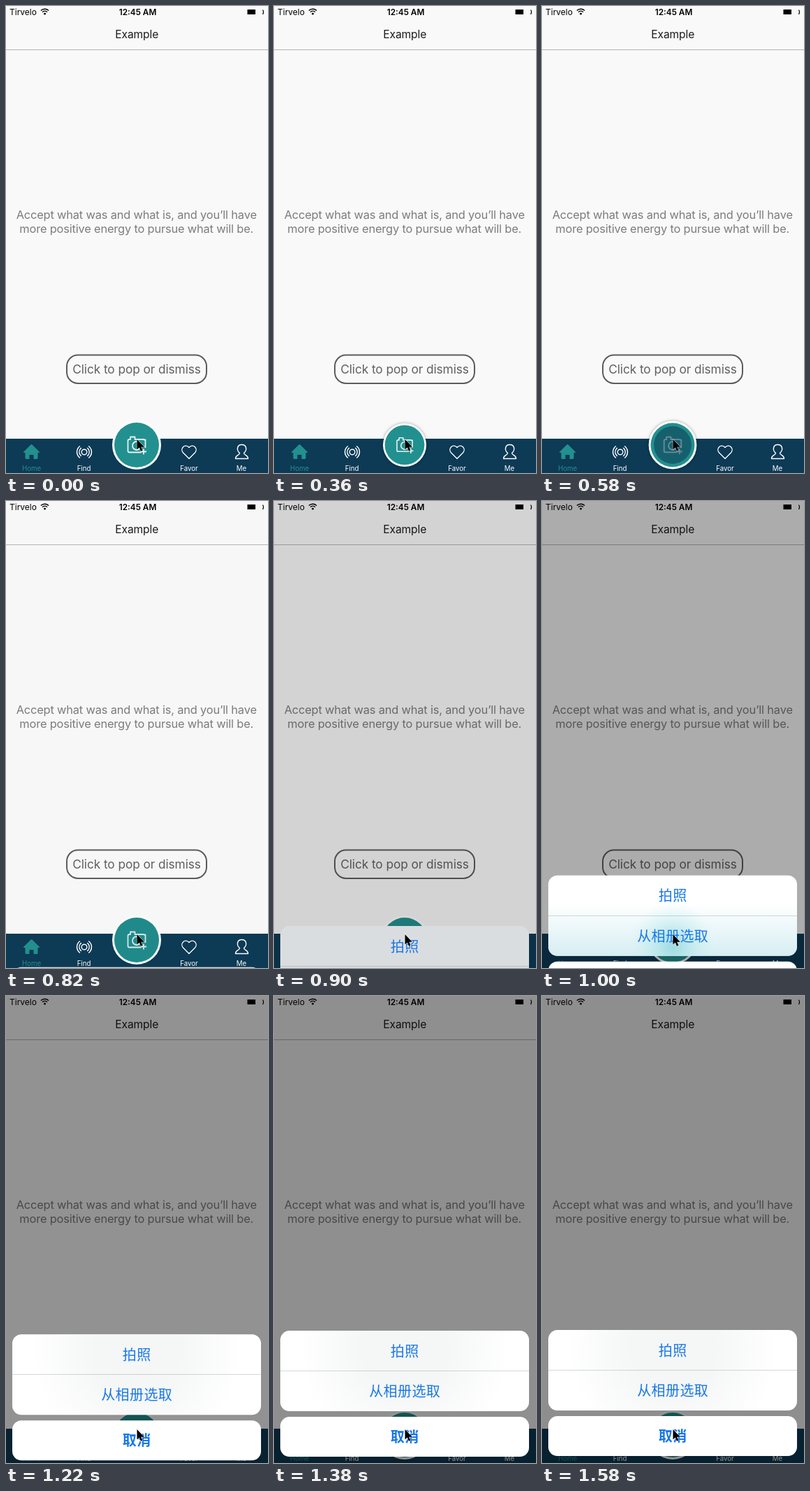
These frames come from a looping animation (375x667 px, 2.58 s). An HTML page with a canvas:

```html
<!DOCTYPE html>
<html lang="en">
<head>
<meta charset="utf-8">
<title>Action sheet</title>
<style>
  html, body { margin: 0; width: 100%; height: 100%; overflow: hidden; background: #f9f9f9; }
  canvas { display: block; width: 375px; height: 667px; }
</style>
</head>
<body>
<canvas id="stage"></canvas>
<script>
const W = 375, H = 667, LOOP = 2580;
const RISE = 812, SETTLED = 1560;
const LATIN = 'Inter, sans-serif';
const HAN = '"Noto Sans CJK SC", "Noto Sans CJK", sans-serif';
const TEAL = '#22908f', NAVY = '#0d3a55', BLUE = '#1877e8';
const HUB = { x: 187, y: 627 };

const canvas = document.getElementById('stage');
const ctx = canvas.getContext('2d');
const dpr = window.devicePixelRatio || 1;
canvas.width = W * dpr;
canvas.height = H * dpr;

const clamp = v => Math.max(0, Math.min(1, v));
const ramp = (t, a, b) => clamp((t - a) / (b - a));
const smooth = v => v * v * (3 - 2 * v);

// Share of the way still to go in a critically damped spring.
function springLeft(t) {
  const p = Math.max(0, t - RISE) * 0.0128;
  return (1 + p) * Math.exp(-p);
}

function text(str, x, y, size, color, { weight = 400, align = 'center', font = LATIN, track = 0 } = {}) {
  ctx.font = `${weight} ${size}px ${font}`;
  ctx.letterSpacing = track + 'px';
  ctx.textAlign = align;
  ctx.fillStyle = color;
  ctx.fillText(str, x, y);
}

function disc(x, y, r, color) {
  ctx.beginPath();
  ctx.arc(x, y, r, 0, Math.PI * 2);
  ctx.fillStyle = color;
  ctx.fill();
}

function box(x, y, w, h, r) {
  ctx.beginPath();
  ctx.roundRect(x, y, w, h, r);
}

function line(d, color, width) {
  ctx.strokeStyle = color;
  ctx.lineWidth = width;
  ctx.stroke(new Path2D(d));
}

function arc(x, y, r, mid, half) {
  ctx.beginPath();
  ctx.arc(x, y, r, mid - half, mid + half);
  ctx.stroke();
}

function statusBar() {
  text('Tirvelo', 5, 13, 12, '#000', { align: 'left' });
  text('12:45 AM', 188.5, 13, 11.8, '#000', { weight: 600 });
  ctx.strokeStyle = '#000';
  ctx.lineWidth = 1.4;
  arc(55.5, 12, 7.8, -Math.PI / 2, 0.8);
  arc(55.5, 12, 4.8, -Math.PI / 2, 0.8);
  disc(55.5, 11, 1.5, '#000');
  ctx.fillStyle = '#000';
  ctx.fillRect(345.5, 5, 11.5, 7);
  line('M367.5 5.5 q2 3 0 6.5', '#000', 1.2);
}

function page(t) {
  ctx.fillStyle = '#f9f9f9';
  ctx.fillRect(0, 0, W, H);
  statusBar();
  text('Example', 187.2, 46, 15.6, '#1c1c1c', { track: -0.1 });
  if (t < SETTLED) {
    ctx.fillStyle = '#b4b4b4';
    ctx.fillRect(0, 62, W, 1);
  }
  const quote = { track: -0.17 };
  text('Accept what was and what is, and you’ll have', 186.7, 304, 16.4, '#7c7c7c', quote);
  text('more positive energy to pursue what will be.', 186.7, 324, 16.4, '#7c7c7c', quote);
  box(87, 498.5, 200, 40.5, 16);
  ctx.strokeStyle = '#5c5c5c';
  ctx.lineWidth = 2;
  ctx.stroke();
  text('Click to pop or dismiss', 187, 525, 17.3, '#606060', { track: -0.08 });
}

function tabBar() {
  ctx.fillStyle = NAVY;
  ctx.fillRect(0, 618, W, 49);

  ctx.fillStyle = TEAL;
  ctx.fill(new Path2D('M25 637 L35 627 Q36.5 625.6 38 627 L48 637 Q48.6 638 47.5 638 H45.5 V645.5 Q45.5 647 44 647 H39.5 V641 H33.5 V647 H29 Q27.5 647 27.5 645.5 V638 H25.5 Q24.4 638 25 637 Z'));

  ctx.strokeStyle = '#fff';
  ctx.lineWidth = 1.4;
  arc(112, 637, 3.8, 0, Math.PI);
  for (const side of [0, Math.PI]) {
    arc(112, 637, 7.2, side, 0.95);
    arc(112, 637, 10.5, side, 0.95);
  }
  line('M262 646.5 L253.5 638 C248.5 632.5 256 624 262 630.5 C268 624 275.5 632.5 270.5 638 Z', '#fff', 1.4);
  line('M334.5 638.5 C329.5 634.5 330.5 626.5 337.5 626.5 C344.5 626.5 345.5 634.5 340.5 638.5 C340.5 642 346.5 641 346.5 646.5 H328.5 C328.5 641 334.5 642 334.5 638.5 Z', '#fff', 1.4);

  text('Home', 36.5, 663.5, 9.7, TEAL);
  text('Find', 111.5, 663.5, 9.7, '#fff');
  text('Favor', 262, 663.5, 9.7, '#fff');
  text('Me', 337, 663.5, 9.7, '#fff');
}

function camera() {
  line('M10 -7.5 H12.5 V4 M6.5 10.5 H-10.5 Q-12.5 10.5 -12.5 8.5 V-6 Q-12.5 -8 -10.5 -8 H-9 V-11.5 H-2.5 V-8 H10.5', '#e4f3f2', 1.8);
  ctx.beginPath();
  ctx.arc(0, 1, 6, 0, Math.PI * 2);
  ctx.stroke();
  line('M10 5.5 V13.5 M6 9.5 H14', '#e4f3f2', 1.8);
}

// The round button: shrinks under the press, springs back with a ripple.
function hub(t) {
  const press = smooth(ramp(t, 20, 340)) * (1 - smooth(ramp(t, 400, 640)));
  const glow = ramp(t, 100, 340) * (1 - ramp(t, 620, 820));
  const scale = 1 - 0.114 * press;
  ctx.save();
  ctx.translate(HUB.x, HUB.y);
  ctx.scale(scale, scale);
  ctx.shadowColor = `rgba(0,0,0,${0.35 * glow})`;
  ctx.shadowBlur = 4 * dpr;
  disc(0, 0, 35, '#fff');
  ctx.shadowColor = 'transparent';
  disc(0, 0, 32, TEAL);
  camera();
  const r = 32 * ramp(t, 380, 615);
  const fade = 1 - ramp(t, 650, 840);
  if (r > 0 && fade > 0) disc(0, 0, r, `rgba(13,58,85,${0.55 * fade})`);
  ctx.restore();
}

function card(y, h, left) {
  const grey = ramp(left, 0.3, 0.68);
  box(9, y, 356, h, 13);
  ctx.fillStyle = `rgb(${255 - 37 * grey},${255 - 34 * grey},${255 - 32 * grey})`;
  ctx.fill();
}

// The bar and the button shine through the frosted card while it rises.
function frost(y, h, left) {
  const tint = ramp(left, 0.04, 0.3) * (1 - ramp(left, 0.3, 0.68));
  ctx.save();
  box(9, y, 356, h, 13);
  ctx.clip();

  const bar = ctx.createLinearGradient(0, 575, 0, 650);
  bar.addColorStop(0, 'rgba(200,232,238,0)');
  bar.addColorStop(1, `rgba(200,232,238,${0.75 * tint})`);
  ctx.fillStyle = bar;
  ctx.fillRect(9, y, 356, h);

  const spot = ctx.createRadialGradient(HUB.x, HUB.y + 8, 4, HUB.x, HUB.y + 8, 62);
  spot.addColorStop(0, `rgba(120,208,214,${0.6 * tint})`);
  spot.addColorStop(0.45, `rgba(170,228,232,${0.45 * tint})`);
  spot.addColorStop(1, 'rgba(200,240,244,0)');
  ctx.fillStyle = spot;
  ctx.fillRect(9, y, 356, h);

  const calm = 1 - ramp(left, 0.03, 0.3);
  const haze = ctx.createRadialGradient(HUB.x, y + 25, 60, HUB.x, y + 25, 150);
  haze.addColorStop(0, `rgba(245,246,246,${calm})`);
  haze.addColorStop(1, 'rgba(245,246,246,0)');
  ctx.fillStyle = haze;
  ctx.fillRect(9, y, 356, h);
  ctx.restore();
}

function sheet(left) {
  const top = 477 + 190 * left;
  const han = { font: HAN, track: 0.4 };
  card(top, 115, left);
  frost(top, 115, left);
  ctx.fillStyle = 'rgba(60,80,90,.22)';
  ctx.fillRect(9, Math.round(top + 57), 356, 1);
  text('拍照', 187.2, top + 36.5, 20, BLUE, han);
  text('从相册选取', 187.2, top + 94, 20, BLUE, han);
  card(top + 123, 57, left);
  text('取消', 187.2, top + 159, 20, BLUE, { ...han, weight: 700 });
}

function cursor() {
  const p = new Path2D('M187.5 619 V633.5 L190.8 630.6 L193 635.8 L195.4 634.8 L193.2 629.7 H197.8 Z');
  ctx.lineJoin = 'miter';
  ctx.strokeStyle = 'rgba(255,255,255,.6)';
  ctx.lineWidth = 1.2;
  ctx.stroke(p);
  ctx.fillStyle = '#000';
  ctx.fill(p);
}

function draw(t) {
  ctx.setTransform(dpr, 0, 0, dpr, 0, 0);
  ctx.lineJoin = 'round';
  page(t);
  tabBar();
  hub(t);
  if (t > RISE) {
    // The dimming runs slightly ahead of the sheet.
    ctx.fillStyle = `rgba(0,0,0,${0.43 * (1 - springLeft(t + 8))})`;
    ctx.fillRect(0, 0, W, H);
    sheet(springLeft(t));
  }
  cursor();
}

const start = performance.now();
function tick() {
  draw((performance.now() - start) % LOOP);
  requestAnimationFrame(tick);
}
tick();
</script>
</body>
</html>
```
